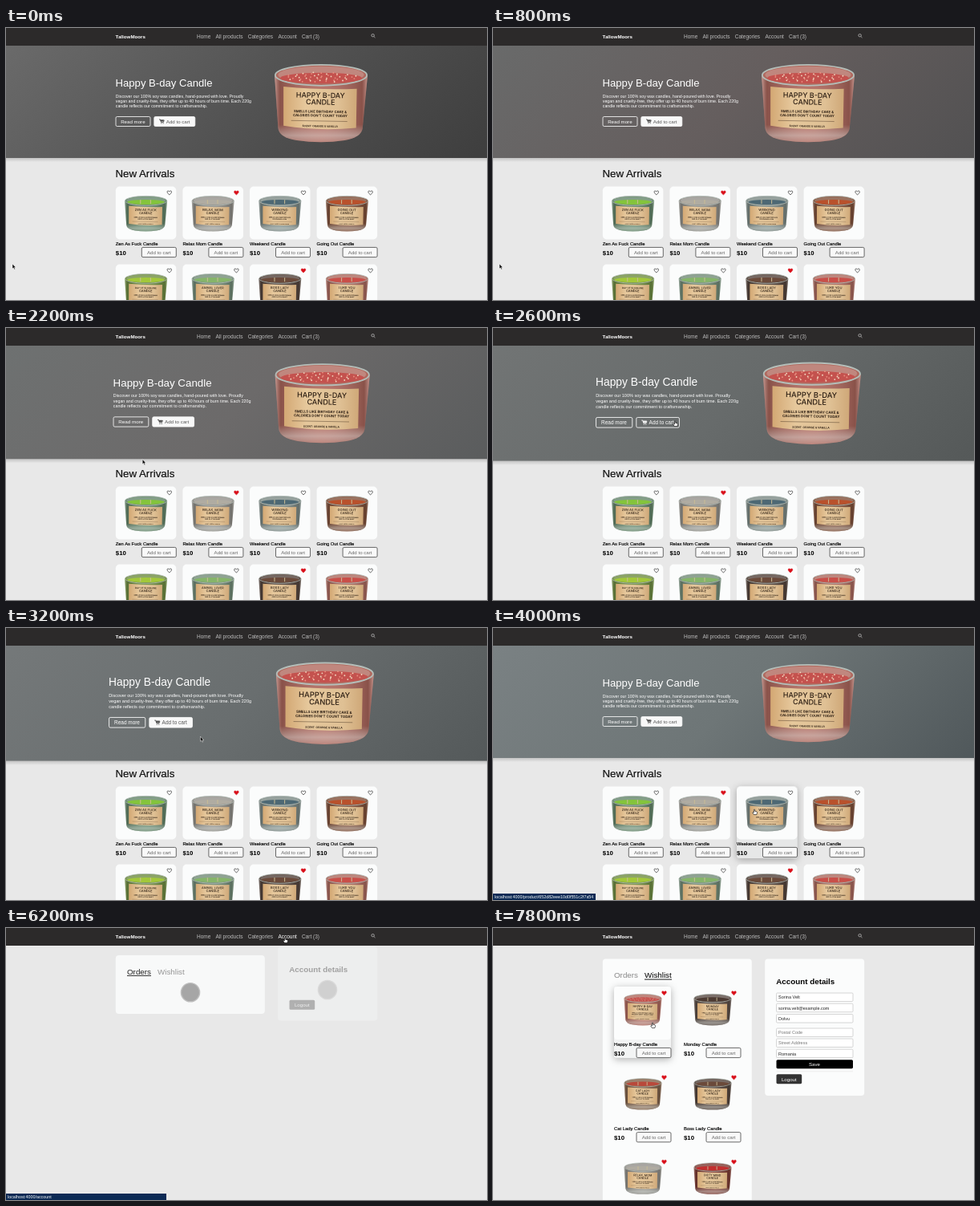
Recreate the animation shown at these times as an HTML page. Size 600 by 339 pixels, loop 8 s.

```html
<!DOCTYPE html>
<html lang="en">
<head>
<meta charset="utf-8">
<title>Candle shop</title>
<style>
html, body { margin: 0; width: 100%; height: 100%; overflow: hidden; background: #e8e8e8; }
svg { display: block; width: 100vw; height: 100vh; font-family: "Liberation Sans", Arial, sans-serif; }
.label { font-family: Inter, "Open Sans", sans-serif; text-anchor: middle; fill: #2b1d12; }
.mid { text-anchor: middle; }
.bold { font-weight: 700; }
.firm { stroke: #111; stroke-width: .2; }
</style>
</head>
<body>
<svg id="stage" viewBox="0 0 600 339">
  <defs>
    <linearGradient id="heroFill" gradientUnits="userSpaceOnUse" x1="0" y1="22" x2="370" y2="392">
      <stop/><stop offset=".5"/><stop offset="1"/>
    </linearGradient>
    <linearGradient id="paper">
      <stop stop-color="#d3a874"/><stop offset=".3" stop-color="#e6c89c"/>
      <stop offset=".75" stop-color="#dfc094"/><stop offset="1" stop-color="#cfa878"/>
    </linearGradient>
    <linearGradient id="shine">
      <stop stop-color="#fff" stop-opacity=".35"/><stop offset=".06" stop-color="#000" stop-opacity=".22"/>
      <stop offset=".5" stop-color="#fff" stop-opacity=".08"/><stop offset=".94" stop-color="#000" stop-opacity=".22"/>
      <stop offset="1" stop-color="#fff" stop-opacity=".3"/>
    </linearGradient>
    <linearGradient id="base" x2="0" y2="1">
      <stop offset=".74" stop-color="#e4ebe8" stop-opacity="0"/><stop offset=".9" stop-color="#e4ebe8" stop-opacity=".4"/>
      <stop offset="1" stop-color="#e4ebe8" stop-opacity=".15"/>
    </linearGradient>
    <linearGradient id="fall" x2="0" y2="1">
      <stop stop-color="#000" stop-opacity=".16"/><stop offset="1" stop-color="#000" stop-opacity="0"/>
    </linearGradient>
    <filter id="lift" x="-30%" y="-30%" width="160%" height="160%">
      <feDropShadow dx="0" dy="2" stdDeviation="5" flood-opacity=".3"/>
    </filter>
  </defs>
</svg>
<script>
const LOOP = 8000, STEP = 200;
const stage = document.getElementById('stage');
const el = id => document.getElementById(id);

const text = (x, y, size, str, fill = '#111', extra = '') =>
  `<text x="${x}" y="${y}" font-size="${size}" fill="${fill}" ${extra}>${str}</text>`;
const box = (x, y, w, h, fill, r = 0, extra = '') =>
  `<rect x="${x}" y="${y}" width="${w}" height="${h}" rx="${r}" fill="${fill}" ${extra}/>`;
const group = (id, body, extra = '') => `<g id="${id}" ${extra}>${body}</g>`;
const bold = 'class="bold"', mid = 'class="mid"', firm = 'class="firm"';

// name: [label title, wax, glass, small print, scent]
const plain = ['SMELLS LIKE A SLOW EVENING', 'AND A LITTLE QUIET'];
const kinds = {
  'Happy B-day Candle': ['HAPPY B-DAY', '#c4524e', '#b0695e', ['SMELLS LIKE BIRTHDAY CAKE &amp;', "CALORIES DON'T COUNT TODAY"], 'ORANGE &amp; VANILLA'],
  'Zen As Fuck Candle': ['ZEN AS FUCK', '#84c43c', '#64866a', plain],
  'Relax Mom Candle': ['RELAX, MOM', '#b0aca2', '#92908a', plain],
  'Weekend Candle': ['WEEKEND', '#4d6874', '#7d8a86', ['SMELLS LIKE&#160; INAPPROPIATE', 'BEHAVIOUR &amp; FUN'], 'AMBER &amp; SANDALWOOD'],
  'Going Out Candle': ['GOING OUT', '#b9512c', '#80503a', plain],
  'Ray Of Sunshine Candle': ['RAY OF SUNSHINE', '#a3c83a', '#6f8d42', plain],
  'Animal Lover Candle': ['ANIMAL LOVER', '#86b56a', '#738c78', plain],
  'Boss Lady Candle': ['BOSS LADY', '#6b4a3a', '#54443c', plain],
  'I Like You Candle': ['I LIKE YOU', '#c94f49', '#ac6a5f', plain],
  'Monday Candle': ['MONDAY', '#4d3b33', '#5c4e47', plain],
  'Cat Lady Candle': ['CAT LADY', '#b9493b', '#82624a', plain],
  'Dirty Mind Candle': ['DIRTY MIND', '#c22f2f', '#7e3c34', plain]
};

function candle(name, x, y, w) {
  const [title, wax, glass, small, scent = 'AMBER &amp; VANILLA'] = kinds[name];
  const body = 'M0 32L10 178Q12 205 62 213Q130 223 196 213Q242 205 246 180L260 32Z';
  const birthday = title === 'HAPPY B-DAY';
  let dots = '';
  for (let i = 0; birthday && i < 50; i++) {
    const a = i * 2.4, r = Math.sqrt(i / 50);
    dots += `<circle cx="${130 + 105 * r * Math.cos(a)}" cy="${37 + 14 * r * Math.sin(a)}" r="2" fill="${i % 2 ? '#f3d9c0' : '#e98d7f'}"/>`;
  }
  const wick = cx => box(cx, 25, 5, 25, '#c9bd95', 2);
  const line = (y, size, str, weight) =>
    `<text class="label" x="128" y="${y}" font-size="${size}" font-weight="${weight}">${str}</text>`;
  return `<g transform="translate(${x} ${y}) scale(${w / 260})">
    <path d="${body}" fill="${glass}"/><path d="${body}" fill="url(#shine)"/><path d="${body}" fill="url(#base)"/>
    <ellipse cx="130" cy="31" rx="128" ry="29" fill="${glass}" stroke="#b4beb9" stroke-width="4"/>
    <ellipse cx="130" cy="30" rx="120" ry="24" fill="#fff" opacity=".2"/>
    <ellipse cx="130" cy="39" rx="114" ry="15" fill="${wax}"/>${dots}${birthday ? '' : wick(94) + wick(156)}
    <path d="M25 63Q130 73 230 69L228 178Q125 188 25 172Z" fill="url(#paper)"/>
    <g transform="rotate(1 128 120)">${line(94, Math.min(20, 220 / title.length), title, 500)}${line(113, 20, 'CANDLE', 500)}
    ${line(136, 9.5, small[0], 700)}${line(147, 9.5, small[1], 700)}
    <path d="M47 159H204" stroke="#4a3524"/>${line(176, 7.3, 'SCENT: ' + scent, 600)}</g></g>`;
}

const heart = (x, y, on) =>
  `<path transform="translate(${x} ${y})" d="M0 2.6C-4.6-.6-2.5-3.6 0-1.4C2.5-3.6 4.6-.6 0 2.6Z" fill="${on ? '#d9101b' : 'none'}" stroke="${on ? '#d9101b' : '#222'}" stroke-width=".7"/>`;

// name, price and button under a picture; w is the card width
const buyRow = (name, x, y, w) =>
  text(x, y, 5.85, name, '#111', firm) + text(x, y + 11.5, 7.8, '$10', '#000', bold) +
  box(x + w - 43, y + 2.4, 43, 12.2, '#f9f9f9', 1.6, 'stroke="#444" stroke-width=".8"') +
  text(x + w - 36.3, y + 10.8, 6.15, 'Add to cart', '#666');

const card = (name, x, y, liked) =>
  box(x, y, 75.5, 66, '#fbfcfc', 5) + candle(name, x + 11.3, y + 11.5, 53) +
  heart(x + 67, y + 7.7, liked) + buyRow(name, x, y + 73.5, 75.5);

const wish = (name, x, y) =>
  candle(name, x + 12.5, y + 9, 47) + heart(x + 62.5, y + 8, true) + buyRow(name, x, y + 74, 71);

const names = Object.keys(kinds);
const grid = names.slice(1, 9).map((n, i) =>
  group('card' + i, card(n, 136.8 + i % 4 * 83.6, 197.5 + (i >> 2) * 97, i === 1 || i === 6))).join('');

const cart = '<path d="M191 114h1.4l1 3.3h3l.8-2.4h-4.4" stroke-width=".9"/><path d="M193 115.6h3.4" stroke-width="1.6"/><path d="M193.8 118.7h.1M196.1 118.7h.1" stroke-width="1.1" stroke-linecap="round"/>';
const hero = box(0, 22, 600, 140, 'url(#heroFill)') + box(0, 162, 600, 5, 'url(#fall)') +
  text(136.6, 73.3, 13.1, 'Happy B-day Candle', '#fff') +
  ['Discover our 100% soy wax candles, hand-poured with love. Proudly',
   'vegan and cruelty-free, they offer up to 40 hours of burn time. Each 220g',
   'candle reflects our commitment to craftsmanship.'].map((s, i) => text(136.8, 86.6 + i * 6.3, 5.25, s, '#fff')).join('') +
  box(137, 110.5, 43, 12, 'none', 1.6, 'stroke="#fff" stroke-width=".8"') +
  text(143.2, 118.8, 6.15, 'Read more', '#fff') +
  box(184.8, 110.5, 51, 12, '#f8f8f8', 1.6, 'id="buyBox" stroke="#f8f8f8" stroke-width=".8"') +
  `<g id="buyIcon" fill="none">${cart}</g>` + text(199.8, 118.8, 6.15, 'Add to cart', '#555', 'id="buyText"') +
  candle('Happy B-day Candle', 335, 45, 116);

const home = text(136.4, 186.2, 13.3, 'New Arrivals', '#111', firm) + grid + group('hero', hero);

const field = (y, str, fill = '#222', x = 353.5, w = 95.5, h = 10.5) =>
  box(x, y, w, h, '#fff', 1.2, 'stroke="#bbb" stroke-width=".6"') + text(x + 2.6, y + 7.3, 5.5, str, fill);

const product = box(136.8, 38.5, 125, 136, '#fbfcfc', 4) + candle('Weekend Candle', 165, 66, 70) +
  box(151, 141, 18, 18, '#fff', 1, 'stroke="#888" stroke-width=".7"') + candle('Weekend Candle', 153, 144, 14) +
  text(277, 54, 9, 'Weekend Candle', '#111', bold) +
  text(277, 69.2, 6.6, 'Smells like inappropiate behaviour &amp; fun - amber &amp; sandalwood') +
  text(277, 86, 9.75, '$10', '#111', bold) +
  box(277, 95, 46, 12.5, '#2d2d2d', 1.6) + text(285, 103.4, 6.15, 'Add to cart', '#fff') +
  text(136.6, 199, 9.75, 'Product Reviews', '#111', bold) +
  box(136.8, 209, 155, 112, '#fbfcfc', 4) + box(299, 209, 164, 55, '#fbfcfc', 4) +
  text(145, 229, 7.8, 'Add a Review', '#111', bold) +
  text(145, 256, 12, '☆☆☆☆☆', '#444', 'style="font-family:\'DejaVu Sans\',sans-serif"') +
  field(259, 'Title', '#777', 145, 139, 10) + field(271.5, 'Your review here...', '#777', 145, 139, 17.5) +
  box(145, 301, 68, 12, '#222', 1.6) + text(179, 309.2, 6.3, 'Submit Your Review', '#fff', mid) +
  text(307, 229, 6.3, 'No reviews yet.', '#555');

const orders = [0, 1, 2, 3, 4, 5, 6].map(i => {
  const y = 75 + i * 40;
  return box(151, y, 157, 34, '#f1f1f1', 3) + text(157, y + 11, 6.2, 'Order ' + (7 - i), '#111', bold) +
    text(157, y + 20, 5.5, 'Status: Processing', '#666') + text(157, y + 28, 5.5, 'Items: ' + (1 + i % 3), '#666') +
    text(302, y + 20, 7.8, '$' + 10 * (1 + i % 3), '#111', 'class="bold" text-anchor="end"');
}).join('');

const picks = ['Happy B-day', 'Monday', 'Cat Lady', 'Boss Lady', 'Relax Mom', 'Dirty Mind'];
const wishlist = box(151, 73, 71, 89, '#f3f4f4', 4, 'id="wishLift" filter="url(#lift)"') +
  box(151, 73, 71, 66, '#fcfdfd', 4) +
  picks.map((n, i) => wish(n + ' Candle', 151 + i % 2 * 87, 73 + (i >> 1) * 105.2)).join('');

const spinner = (x, y) => `<circle cx="${x}" cy="${y}" r="11.6" fill="#9b9b9b" stroke="#b9b9b9" stroke-width="1.4"/>`;
const logout = y => box(353.5, y, 31.7, 12, '#333', 1.6) + text(369.3, y + 8.3, 6.15, 'Logout', '#fff', mid);
const account =
  group('left', box(136.8, 38.5, 186, 73, '#fbfcfc', 4, 'id="leftPanel"') +
    text(151, 62, 9.8, 'Orders', '#000', 'id="tabOrders"') + text(189, 62, 9.8, 'Wishlist', '#888', 'id="tabWish"') +
    box(151, 63.6, 30, .9, '#000', 0, 'id="tabLine"') +
    group('leftWait', spinner(230, 84.7)) + group('orders', orders) + group('wishlist', wishlist)) +
  group('right', box(339.2, 38.5, 124, 92, '#fbfcfc', 4, 'id="rightPanel"') +
    text(353.3, 70, 9.8, 'Account details', '#000', bold) +
    group('rightWait', spinner(401, 92) + logout(104.8)) +
    group('details', field(81, 'Sorina Velt') + field(94.2, 'sorina.velt@example.com') + field(107.5, 'Dolvu') +
      field(125, 'Postal Code', '#777') + field(138, 'Street Address', '#777') + field(151.2, 'Romania') +
      box(353.5, 164.2, 95.5, 11, '#000', 1.6) + text(401, 172, 6.15, 'Save', '#fff', mid) +
      '<path d="M353.5 178.8H449" stroke="#ddd" stroke-width=".5"/>' + logout(182.2)));

const header = box(0, 0, 600, 22, '#2c2a2a') + text(136.6, 12.7, 6.2, 'TallowMoors', '#fff', bold) +
  [[238, 'Home'], [261.5, 'All products'], [301.7, 'Categories'], [339.4, 'Account'], [369, 'Cart (3)']]
    .map(([x, s]) => text(x, 12.7, 6.5, s, '#bdbdbd', `id="nav${s[0]}${s.length}"`)).join('') +
  '<g fill="none" stroke="#ccc" stroke-width=".7"><circle cx="457.6" cy="9.2" r="1.7"/><path d="M458.9 10.5l1.6 1.6"/></g>';

const lightbox = box(0, 0, 600, 339, '#000', 0, 'opacity=".72"') + group('zoomed', candle('Weekend Candle', 172, 64, 260));

const pointers =
  group('arrow', '<path d="M0 0V6L1.4 4.8L2.4 7L3.4 6.6L2.5 4.5H4.2Z" fill="#000" stroke="#fff" stroke-width=".5"/>') +
  group('hand', '<path d="M-.6 2V-1.6Q0-2.6.7-1.6V.3L3 .9Q3.8 1.2 3.5 2.4L2.8 4.6H-.6L-2.3 2Q-1.8 1-.6 2Z" fill="#fff" stroke="#000" stroke-width=".6"/>') +
  group('loupe', '<path d="M1.4 1.4L3.6 3.6" stroke="#fff" stroke-width="2.2"/><path d="M1.4 1.4L3.6 3.6" stroke="#000" stroke-width="1.3"/><circle r="2.2" fill="#fff" stroke="#000" stroke-width=".8"/><path d="M-1 0H1M0-1V1" stroke="#000" stroke-width=".6"/>');

stage.insertAdjacentHTML('beforeend',
  box(0, 0, 600, 339, '#e8e8e8') + group('home', home) + group('product', product) + group('account', account) +
  group('header', header) + group('lightbox', lightbox) +
  group('status', box(0, 331, 128, 8, '#0c2a55', 0, 'id="statusBox"') + text(2, 337, 5.35, '', '#fff', 'id="statusText"')) +
  group('pointer', pointers));

const clamp = v => Math.max(0, Math.min(1, v));
const ramp = (t, a, b) => { const u = clamp((t - a) / (b - a)); return u * u * (3 - 2 * u); };
const set = (id, attr, v) => el(id).setAttribute(attr, v);
const show = (id, v) => {
  set(id, 'opacity', +v);
  set(id, 'visibility', v > 0 ? 'inherit' : 'hidden');
};

// eased value list between timed keys [time, ...values]
function along(keys, t) {
  let i = 0;
  while (i < keys.length - 2 && t >= keys[i + 1][0]) i++;
  const [t0, ...a] = keys[i], [t1, ...b] = keys[i + 1], u = ramp(t, t0, t1);
  return a.map((v, k) => v + (b[k] - v) * u);
}

const route = [[0, 8, 294], [1600, 8, 294], [2500, 227, 118], [3000, 227, 118], [3800, 326, 228], [4200, 326, 228],
  [4600, 205, 100], [4800, 230, 112], [5000, 271, 130], [5300, 271, 130], [5900, 348, 14], [6300, 348, 14],
  [7000, 206, 57], [7400, 206, 57], [7800, 199, 120], [8000, 199, 120]];
const tones = [[0, 106, 106, 106, 83, 83, 83, 62, 62, 62], [1600, 104, 106, 106, 118, 105, 104, 102, 100, 101],
  [2600, 114, 117, 117, 103, 107, 107, 84, 88, 88], [4200, 122, 130, 132, 110, 118, 120, 80, 88, 91]];
const stops = el('heroFill').children;

function draw(t) {
  const page = t < 4400 ? 'home' : t < 6000 ? 'product' : 'account';
  for (const p of ['home', 'product', 'account']) show(p, p === page);

  const rgb = along(tones, t);
  for (let i = 0; i < 3; i++) stops[i].setAttribute('stop-color', `rgb(${rgb.slice(i * 3, i * 3 + 3).map(Math.round)})`);
  const grow = 1 + .052 * (ramp(t, 2000, 2500) - ramp(t, 3200, 3700));
  set('hero', 'transform', `translate(300 92) scale(${grow}) translate(-300 -92)`);
  const onBuy = t >= 2400 && t < 3200;
  set('buyBox', 'fill', onBuy ? 'none' : '#f8f8f8');
  set('buyBox', 'stroke', onBuy ? '#fff' : '#f8f8f8');
  set('buyText', 'fill', onBuy ? '#fff' : '#555');
  set('buyIcon', 'stroke', onBuy ? '#fff' : '#444');
  const onCard = t >= 3600 && t < 4400;
  if (onCard && !el('cardLift'))
    el('card2').insertAdjacentHTML('afterbegin', box(304, 197.5, 75.5, 89.5, '#e6e7e7', 4, 'id="cardLift" filter="url(#lift)"'));
  if (el('cardLift')) show('cardLift', onCard);

  show('product', page === 'product' ? ramp(t, 4200, 4600) : 0);
  const zoom = ramp(t, 4600, 5000) - ramp(t, 5200, 5600);
  show('lightbox', zoom);
  const k = .8 + .2 * zoom;
  set('zoomed', 'transform', `translate(302 174) scale(${k}) translate(-302 -174)`);

  const loaded = t >= 6400, wishOn = t >= 7400;
  const inLeft = t < 6200 ? 0 : t < 6400 ? .85 : 1;
  const inRight = t < 6200 ? 0 : t < 6400 ? .3 : t < 6600 ? .85 : 1;
  show('left', inLeft);
  show('right', inRight);
  set('left', 'transform', `translate(0 ${-30 * (1 - inLeft)})`);
  set('right', 'transform', `translate(0 ${-21.4 * (1 - inRight)})`);
  set('leftPanel', 'height', loaded ? 310 : 73);
  set('rightPanel', 'height', loaded ? 170.5 : 92);
  show('leftWait', !loaded);
  show('rightWait', !loaded);
  show('details', loaded);
  show('orders', loaded && !wishOn);
  show('wishlist', !wishOn ? 0 : t < 7600 ? .5 : 1);
  show('wishLift', t >= 7800);
  set('tabOrders', 'fill', wishOn ? '#888' : '#000');
  set('tabWish', 'fill', wishOn ? '#000' : '#888');
  set('tabLine', 'x', wishOn ? 189 : 151);
  set('tabLine', 'width', wishOn ? 34 : 30);
  const onNav = t >= 5800 && t < 6400;
  set('navA7', 'fill', onNav ? '#fff' : '#bdbdbd');

  const onLink = t >= 3800 && t < 4400;
  show('status', onLink || onNav);
  set('statusBox', 'width', onNav ? 200 : 128);
  el('statusText').textContent = 'localhost:4000/' + (onNav ? 'account' : 'product/652d82eee10d0f551c2f7a54');

  const [x, y] = along(route, t);
  set('pointer', 'transform', `translate(${x} ${y})`);
  const loupe = t >= 4600 && t < 5400;
  const hand = onBuy || onCard || onNav || t >= 7000;
  show('loupe', loupe);
  show('hand', hand && !loupe);
  show('arrow', !hand && !loupe);
}

const start = performance.now();
function tick(now) {
  const t = Math.max(0, now - start) % LOOP;
  draw(Math.floor(t / STEP) * STEP);
  requestAnimationFrame(tick);
}
draw(0);
requestAnimationFrame(tick);
</script>
</body>
</html>
```
